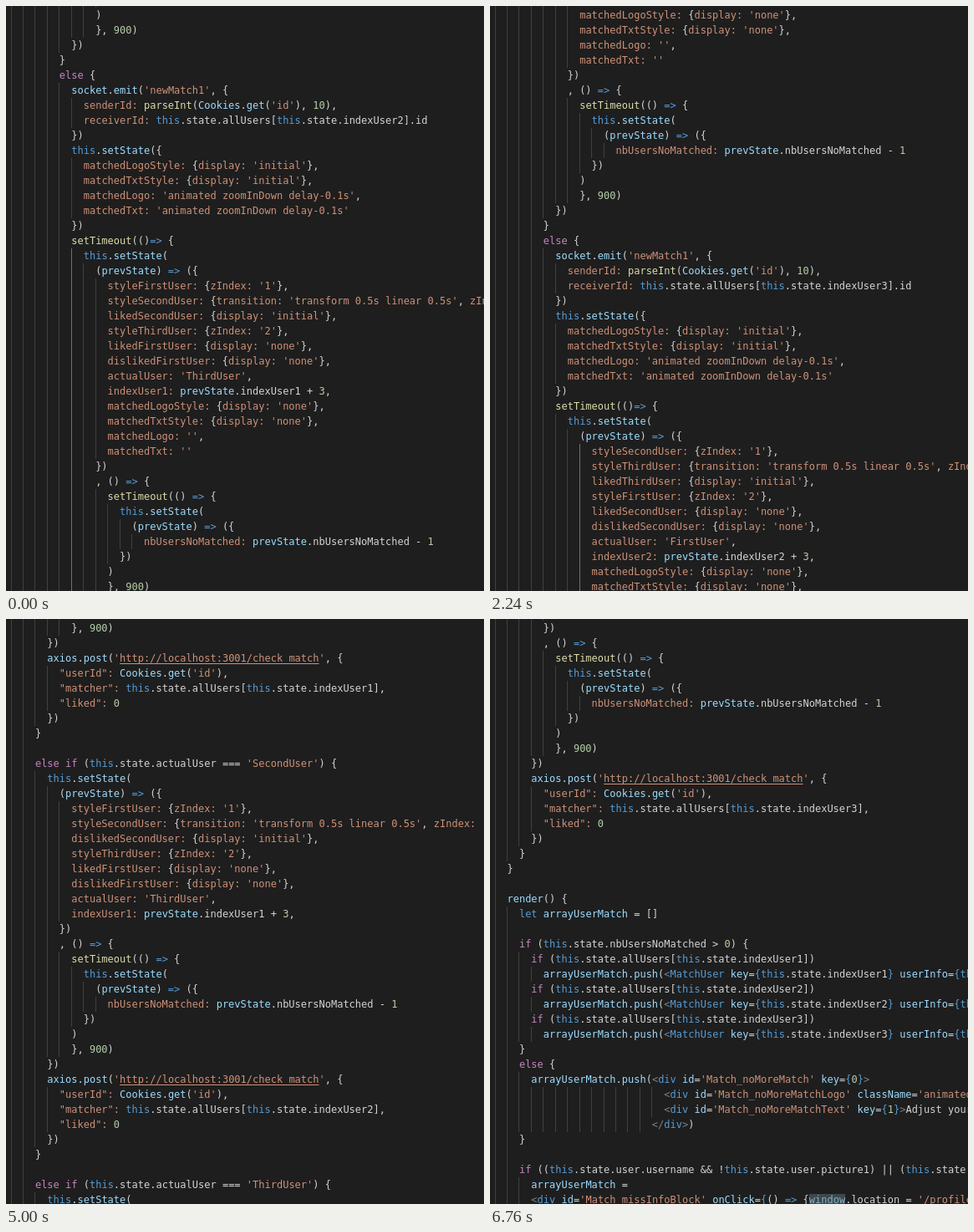
An HTML page for the animation above (7000 ms loop, 572 by 700 pixels).

```html
<!DOCTYPE html>
<html lang="en">
<head>
<meta charset="utf-8">
<title>Scrolling code</title>
<style>
  html, body { margin: 0; width: 100%; height: 100%; overflow: hidden; background: #1e1e1e; }
  #stage { position: relative; width: 572px; height: 700px; overflow: hidden; background: #1e1e1e; }
  #doc { position: absolute; left: 0; top: 2px; width: 100%; }
  .line {
    position: relative; height: 18px; padding-left: 6px; white-space: pre; color: #d4d4d4;
    font: 12px/18px "DejaVu Sans Mono", monospace; font-variant-ligatures: none;
  }
  .guide { position: absolute; top: 0; width: 1px; height: 18px; background: #404040; }
  #active { background: #707070; }
  .str, .key, .url { color: #ce9178; }
  .url { text-decoration: underline; text-underline-offset: 2px; }
  .blue { color: #569cd6; }
  .flow { color: #c586c0; }
  .fn { color: #dcdcaa; }
  .num { color: #b5cea8; }
  .name { color: #9cdcfe; }
  .tag { color: #808080; }
  .mark { color: #7fb4c8; background: #3f474b; }
</style>
</head>
<body>
<div id="stage"><div id="doc"></div></div>
<script>
const ROW = 18, LEFT = 6, CHAR = 7.224;
const FIRST = 29;          // line at the top of the window when the loop starts
const CURSOR = 39;         // cursor row, just below the window
const LINES_PER_STEP = 6.977;
const LOOP = 7000;
const STEPS = [240, 520, 760];

// ---- the code being scrolled ----
const names = ['First', 'Second', 'Third'];
const user = n => names[(n + 2) % 3] + 'User';
const pad = (n, lines) => lines.map(s => s && ' '.repeat(n) + s);

const matched = [
  "matchedLogoStyle: {display: 'none'},",
  "matchedTxtStyle: {display: 'none'},",
  "matchedLogo: '',",
  "matchedTxt: ''"
];

function swipe(n, verb, extra) {
  const prev = (n + 1) % 3 + 1, last = user(prev), next = user(n + 1), now = user(n);
  return [
    'this.setState(',
    '  (prevState) => ({',
    ...pad(4, [
      `style${last}: {zIndex: '1'},`,
      `style${now}: {transition: 'transform 0.5s linear 0.5s', zIndex: '3'},`,
      `${verb}${now}: {display: 'initial'},`,
      `style${next}: {zIndex: '2'},`,
      `liked${last}: {display: 'none'},`,
      `disliked${last}: {display: 'none'},`,
      `actualUser: '${next}',`,
      `indexUser${prev}: prevState.indexUser${prev} + 3,`,
      ...extra
    ]),
    '  })',
    '  , () => {',
    '    setTimeout(() => {',
    '      this.setState(',
    '        (prevState) => ({',
    '          nbUsersNoMatched: prevState.nbUsersNoMatched - 1',
    '      })',
    '    )',
    '    }, 900)',
    '})'
  ];
}

const test = n => `if (this.state.actualUser === '${user(n)}') {`;

const post = (n, liked) => [
  "axios.post('http://localhost:3001/check_match', {",
  `  "userId": Cookies.get('id'),`,
  `  "matcher": this.state.allUsers[this.state.indexUser${n}],`,
  `  "liked": ${liked}`,
  '})'
];

const like = n => pad(4, [
  'else ' + test(n),
  ...pad(2, [
    ...post(n, 1),
    '.then(({data}) => {',
    '  if (!data) {',
    ...pad(4, swipe(n, 'liked', matched)),
    '  }',
    '  else {',
    ...pad(4, [
      "socket.emit('newMatch1', {",
      "  senderId: parseInt(Cookies.get('id'), 10),",
      `  receiverId: this.state.allUsers[this.state.indexUser${n}].id`,
      '})',
      'this.setState({',
      "  matchedLogoStyle: {display: 'initial'},",
      "  matchedTxtStyle: {display: 'initial'},",
      "  matchedLogo: 'animated zoomInDown delay-0.1s',",
      "  matchedTxt: 'animated zoomInDown delay-0.1s'",
      '})',
      'setTimeout(()=> {',
      ...pad(2, swipe(n, 'liked', matched)),
      '}, 1500)'
    ]),
    '  }',
    '})'
  ]),
  '}'
]);

const dislike = n => pad(4, [
  (n > 1 ? 'else ' : '') + test(n),
  ...pad(2, [...swipe(n, 'disliked', []), ...post(n, 0)]),
  '}'
]);

const pushUser = n => [
  `  if (this.state.allUsers[this.state.indexUser${n}])`,
  `    arrayUserMatch.push(<MatchUser key={this.state.indexUser${n}} userInfo={this`
];

const code = [
  ...like(2), '', ...like(3),
  '  }', '',
  '  dislikeClick() {',
  ...dislike(1), '', ...dislike(2), '', ...dislike(3),
  '  }', '',
  '  render() {',
  ...pad(4, [
    'let arrayUserMatch = []',
    '',
    'if (this.state.nbUsersNoMatched > 0) {',
    ...pushUser(1), ...pushUser(2), ...pushUser(3),
    '}',
    'else {',
    "  arrayUserMatch.push(<div id='Match_noMoreMatch' key={0}>",
    ...pad(24, [
      "<div id='Match_noMoreMatchLogo' className='animated'",
      "<div id='Match_noMoreMatchText' key={1}>Adjust your"
    ]),
    ...pad(22, ['</div>)']),
    '}',
    '',
    'if ((this.state.user.username && !this.state.user.picture1) || (this.state.',
    '  arrayUserMatch =',
    "  <div id='Match_missInfoBlock' onClick={() => {window.location = '/profile'"
  ])
];

// ---- syntax colours ----
const rules = [
  ['url', /(?<=')http[^']+/],
  ['key', /"\w+":|\b[A-Za-z]\w*:/],
  ['str', /'(?=http)|(?<=_match)'(?=,)|'[^']*'/],
  ['blue', /=>|\bthis\b|\blet\b|(?<=<\/?)\w+|(?<==)\{|\}(?= userInfo|>)/],
  ['tag', /<\/?|(?<=\}|<\/div)>/],
  ['flow', /\b(?:else|if)\b/],
  ['fn', /\b(?:setTimeout|parseInt)\b/],
  ['num', /\b\d+\b/],
  ['mark', /\bwindow\b/],
  ['name', /\b\w+(?=\(|=['{])|\b(?:prevState|Cookies|socket|axios|data|arrayUserMatch)\b/]
];
const lexer = new RegExp(rules.map(([k, r]) => `(?<${k}>${r.source})`).join('|'), 'g');

function paint(el, text) {
  let at = 0;
  for (const m of text.matchAll(lexer)) {
    el.append(text.slice(at, m.index));
    const span = document.createElement('span');
    span.className = rules.find(([k]) => m.groups[k] !== undefined)[0];
    span.textContent = m[0];
    el.append(span);
    at = m.index + m[0].length;
  }
  el.append(text.slice(at));
}

// ---- indent guides ----
const indent = s => s.search(/\S/) / 2;
const depth = code.map((s, i) => indent(s || code[i + 1]));

function guide(level) {
  const el = document.createElement('div');
  el.className = 'guide';
  el.style.left = Math.floor(LEFT + level * 2 * CHAR) + 'px';
  return el;
}

const doc = document.getElementById('doc');
code.forEach((text, i) => {
  const line = document.createElement('div');
  line.className = 'line';
  for (let d = 0; d < depth[i]; d++) line.append(guide(d));
  paint(line, text);
  doc.append(line);
});

const active = guide(0);
active.id = 'active';
doc.append(active);

function markBlock(row) {
  const d = depth[row];
  active.hidden = !d;
  if (!d) return;
  let from = row, to = row;
  while (depth[from - 1] >= d) from--;
  while (depth[to + 1] >= d) to++;
  active.style.left = Math.floor(LEFT + (d - 1) * 2 * CHAR) + 'px';
  active.style.top = from * ROW + 'px';
  active.style.height = (to - from + 1) * ROW + 'px';
}

// ---- playback ----
const start = performance.now();
let shown = -1;

function tick() {
  const t = (performance.now() - start) % LOOP;
  const step = 4 * Math.floor(t / 1000) + STEPS.filter(s => t % 1000 >= s).length;
  if (step !== shown) {
    shown = step;
    const top = FIRST + Math.round(step * LINES_PER_STEP);
    doc.style.transform = `translateY(${-top * ROW}px)`;
    markBlock(top + CURSOR);
  }
  requestAnimationFrame(tick);
}
tick();
</script>
</body>
</html>
```
